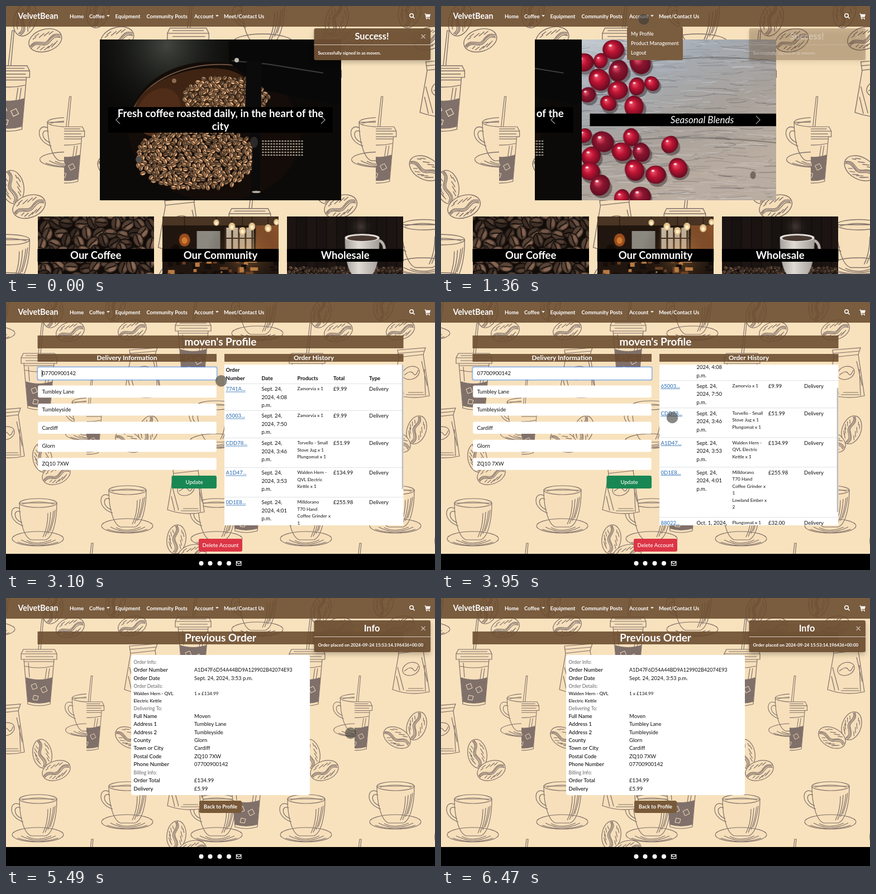
An HTML page with a canvas that plays this animation: 768 by 480 pixels, repeating every 7.16 s.

```html
<!DOCTYPE html>
<html lang="en">
<head>
<meta charset="utf-8">
<title>Coffee shop</title>
<style>
html, body { margin: 0; width: 100%; height: 100%; overflow: hidden; background: #f8e2bd }
canvas { display: block }
</style>
</head>
<body>
<canvas id="stage" width="768" height="480"></canvas>
<script>
const LOOP = 7160, W = 768, H = 480;
const ctx = document.getElementById('stage').getContext('2d');
const BROWN = 'rgba(105,74,45,.88)', CREAM = '#f8e2bd', INK = '#80706a';
const FONT = 'Lato, Cabin, "Open Sans", sans-serif';

let seed = 11;
const rnd = (a = 1, b = 0) => b + (a - b) * ((seed = seed * 16807 % 2147483647) / 2147483647);
const clamp = v => Math.max(0, Math.min(1, v));
const ramp = (t, a, b) => clamp((t - a) / (b - a));
const ease = p => p * p * (3 - 2 * p);

function picture(w, h, draw) {
  const c = document.createElement('canvas');
  c.width = w; c.height = h;
  draw(c.getContext('2d'));
  return c;
}
function rect(x, y, w, h, fill, g = ctx) { g.fillStyle = fill; g.fillRect(x, y, w, h); }
function round(x, y, w, h, r, fill) {
  ctx.beginPath(); ctx.roundRect(x, y, w, h, r);
  ctx.fillStyle = fill; ctx.fill();
}
function oval(g, x, y, rx, ry, fill, a = 0) {
  g.beginPath(); g.ellipse(x, y, rx, ry, a, 0, 7);
  g.fillStyle = fill; g.fill();
}
function poly(g, d, fill) { g.fillStyle = fill; g.fill(new Path2D(d)); }
function line(d, color, width, g = ctx) {
  g.strokeStyle = color; g.lineWidth = width; g.stroke(new Path2D(d));
}
function glow(g, x, y, r, color, w, h) {
  const f = g.createRadialGradient(x, y, 0, x, y, r);
  f.addColorStop(0, color); f.addColorStop(1, 'transparent');
  rect(0, 0, w, h, f, g);
}
// y is the middle of the capitals; "|" starts a new line
function text(s, x, y, size, { color = '#111', weight = 400, align = 'left', gap = 14.5, style = '' } = {}) {
  ctx.font = `${style} ${weight} ${size}px ${FONT}`;
  ctx.fillStyle = color; ctx.textAlign = align;
  s.split('|').forEach((l, i) => ctx.fillText(l, x, y + i * gap + size * .36));
}
const title = (s, x, y, size, o) => text(s, x, y, size, { color: '#fff', align: 'center', weight: 700, ...o });

// ---- wallpaper ----
const P = d => new Path2D(d);
const doodles = {
  bean: [P('M-26 0a26 17 0 1 0 52 0a26 17 0 1 0-52 0'),
    P('M-25 2C-12-9-6 8 4 1S18-6 25-1M-24 5C-12-4-6 12 5 5S18-1 24 3M-24 3C-12-6-6 10 4 3S18-4 24 1M-14-10L-6-13M-8-7L2-11M0-7L10-11M8-7L16-10M-18-7L-12-9M-16 9L-10 6M-12 12L-4 9M-6 14L3 10M0 13L10 8M6 13L14 8M10 11L18 6'),],
  cup: [P('M-46 34a46 13 0 1 0 92 0a46 13 0 1 0-92 0M-33-30C-33 5-24 32-12 36H14C26 32 34 5 34-30Z'),
    P('M-33-30a33.5 8 0 1 0 67 0a33.5 8 0 1 0-67 0M-28-28Q0-36 29-28M-32-20C-50-30-56 2-26 11M-31-14C-44-20-45 0-28 5M-20 37Q0 47 24 36M18-12Q18 14 9 31M23-14Q22 12 13 30M28-16Q26 6 18 25M31-18Q29 2 22 20M-36 40Q0 52 36 40M-30 36Q0 52 32 36')],
  togo: [P('M-28 0H28L32 8V18H-32V8ZM-27 18L-20 98Q0 104 20 98L27 18Z'),
    P('M-32 8H32M-24 13H26M-1 0L5-54L8-54L3 0M-24 4H24M-26 22H26M-26 30Q0 36 25 30M14 34L11 54M19 34L16 54M-19 24L-17 50')],
  bag: [P('M-24-42L26-46L22-34L33 40Q0 48-33 36L-22-28Z'),
    P('M-22-29L23-34M-23-36L24-40M-15 2a15 11-20 1 0 30-6a15 11-20 1 0-30 6M-12 3Q0-7 4 0T13-6M-26 12L-20 38M-24-4L-13 37M24-8L26 40M19-22L29 22M-5 34H22M-9 38H24')]
};
function doodle(g, kind, x, y, a = 0, s = 1) {
  g.save();
  g.translate(x, y); g.rotate(a); g.scale(s, s);
  const [body, lines] = doodles[kind];
  g.fillStyle = '#f6dfba'; g.fill(body);
  g.strokeStyle = INK; g.lineWidth = 1.2;
  g.stroke(body); g.stroke(lines);
  if (kind == 'togo') {
    poly(g, 'M-24 50Q0 58 24 50L20 94Q0 100-20 94Z', INK);
    line('M-14 64l8-3l3 8l-8 3ZM3 70l8-4l4 8l-8 4ZM-9 82l8 2l-2 7l-8-1Z', CREAM, 1, g);
  }
  g.restore();
}
function tile(g) {
  rect(0, 0, 480, 480, CREAM, g);
  [[420, 21, 1.9], [451, 53, -.3], [52, 8, 1.8], [82, 50, -.3], [401, 279, 1.4], [426, 309, -.35],
   [111, 229, 1.9], [76, 250, .5], [161, 425, 1.7], [189, 452, -.3]]
    .forEach(([x, y, a]) => doodle(g, 'bean', x, y, a));
  [[306, 22], [231, 215], [393, 390], [73, 367], [233, 390], [484, 206, 0, .9]].forEach(p => doodle(g, 'cup', ...p));
  [[101, 128], [336, 236], [178, 336]].forEach(p => doodle(g, 'bag', ...p));
  [[395, 92], [191, 34], [286, 312], [4, 186, 0, .86], [4, 486]].forEach(p => doodle(g, 'togo', ...p));
}
const wallpaper = (left, scale) => picture(W, H, g => {
  for (let k = -1; k < 2; k++) {
    g.save();
    g.translate(left + k * 480 * scale, 0); g.scale(scale, scale);
    g.beginPath(); g.rect(0, 0, 480, 480); g.clip();
    tile(g);
    g.restore();
  }
});
const homePaper = wallpaper(104, 1.1625), pagePaper = wallpaper(144, 1);

// ---- photos as simple shapes ----
function roast(g, x, y, r, [red, green, blue]) {
  const v = rnd(1.1, .6), tone = k => `rgb(${red * v * k},${green * v * k},${blue * v * k})`;
  g.save();
  g.translate(x, y); g.rotate(rnd(3.2)); g.scale(r, r);
  oval(g, 0, 0, 1.1, .82, tone(.3));
  oval(g, 0, 0, .95, .68, tone(.85));
  oval(g, -.05, -.3, .6, .26, tone(1.3));
  line('M-.85 .1C-.3-.2 .3 .3 .85 0', tone(.25), .16, g);
  g.restore();
}
// beans packed on a loose grid inside an ellipse
function pile(g, cx, cy, rx, ry, r, color) {
  for (let y = -ry, row = 0; y <= ry; y += r * 1.3, row++)
    for (let x = -rx + row % 2 * r; x <= rx; x += r * 1.8)
      if ((x / rx) ** 2 + (y / ry) ** 2 < 1)
        roast(g, cx + x + rnd(r, -r) * .4, cy + y + rnd(r, -r) * .4, r, color);
}
const TAN = [186, 138, 98], DARK = [98, 74, 60];
const roaster = picture(432, 288, g => {
  rect(0, 0, 432, 288, '#0b0a09', g);
  glow(g, 120, 10, 170, '#42463f', 432, 288);
  oval(g, 205, 165, 155, 125, '#130c08', .1);
  line('M58 130C80 70 160 38 240 46', '#6d5340', 2, g);
  oval(g, 165, 108, 105, 52, '#3f2413', -.25);
  oval(g, 105, 130, 36, 46, '#4f2d18', .6);
  pile(g, 225, 104, 78, 40, 5, TAN);
  pile(g, 172, 212, 108, 58, 5, TAN);
  for (let i = 0; i < 90; i++) oval(g, 292 + i % 15 * 5, 182 + (i / 15 | 0) * 5, 1.8, 1.3, '#a59b8c');
  poly(g, 'M230 0H432V118L300 92L232 42Z', '#080808');
  line('M236 38L300 44L400 60', '#3d3c3a', 2, g);
  poly(g, 'M262 40H290L286 288H270L274 180L260 150Z', '#0c0b0b');
  oval(g, 276, 184, 7, 10, '#2b2927');
  oval(g, 245, 37, 4, 4, '#bdb9ae');
  oval(g, 133, 74, 4, 4, '#8b6a52');
  oval(g, 70, 215, 6, 6, '#55504a');
  oval(g, 280, 273, 8, 2, '#b5aa9c');
});
const berries = picture(432, 288, g => {
  const f = g.createLinearGradient(0, 0, 130, 288);
  ['#c3c9d0', '#a5abb2', '#a8a19b', '#b9aca0'].forEach((c, i) => f.addColorStop(i / 3, c));
  rect(0, 0, 432, 288, f, g);
  for (let i = 0; i < 1100; i++) {
    const y = rnd(288), x = rnd(430, -40), l = rnd(60, 6);
    line(`M${x} ${y}q${l / 2} ${rnd(4, -4)} ${l} ${rnd(4, -4)}`,
      i % 2 ? `rgba(66,66,70,${rnd(.35)})` : `rgba(225,230,236,${rnd(.4)})`, rnd(1.6, .4), g);
  }
  line('M0 190Q200 160 432 196M120 40Q270 20 432 52', 'rgba(60,56,54,.4)', 2, g);
  oval(g, 307, 243, 5, 7, 'rgba(60,50,45,.55)');
  [[57, 18, 18], [105, 42, 19], [34, 38, 13], [4, 41, 17], [32, 72, 19], [66, 56, 18], [65, 91, 17], [126, 79, 13],
   [99, 84, 15], [11, 99, 14], [48, 114, 14], [94, 120, 18], [5, 172, 13], [38, 183, 19], [89, 175, 15], [17, 209, 17],
   [72, 201, 17], [107, 202, 16], [158, 188, 15], [15, 236, 17], [95, 234, 18], [33, 261, 18], [133, 242, 17],
   [173, 230, 17], [72, 283, 14], [105, 281, 18]].forEach(([x, y, r], i) => {
    oval(g, x + 3, y + 5, r * 1.05, r, 'rgba(45,30,35,.45)');
    const b = g.createRadialGradient(x - r * .3, y - r * .3, 1, x, y, r * 1.1);
    b.addColorStop(0, '#e8506a'); b.addColorStop(.4, i % 4 == 1 ? '#8d1631' : '#c01433'); b.addColorStop(1, '#5d0c20');
    oval(g, x, y, r * 1.08, r * .96, b, i);
    oval(g, x - r * .3, y - r * .4, r * .16, r * .12, '#ffd5da');
  });
});
const beanCard = picture(209, 103, g => {
  rect(0, 0, 209, 103, '#120b08', g);
  pile(g, 104, 52, 170, 115, 12, DARK);
});
const cafeCard = picture(209, 103, g => {
  rect(0, 0, 209, 103, '#21160f', g);
  rect(0, 0, 209, 16, '#4a3524', g);
  rect(62, 26, 42, 32, '#8b8880', g);
  rect(112, 20, 52, 42, '#d8cbb6', g);
  for (let i = 0; i < 5; i++) rect(112 + i * 12, 20, 3, 42, '#3b2b20', g);
  rect(112, 38, 52, 2, '#3b2b20', g);
  rect(168, 16, 41, 46, '#8a522c', g);
  glow(g, 150, 66, 70, 'rgba(214,150,84,.5)', 209, 103);
  for (let i = 0; i < 60; i++) rect(rnd(209), rnd(103, 62), rnd(16, 3), rnd(12, 3), ['#150e0a', '#6b4024', '#120c09', '#b87b43'][i % 4], g);
  oval(g, 24, 66, 10, 16, '#120d0a');
  [[40, 42, 10], [97, 11, 5], [125, 18, 6], [144, 26, 6], [161, 18, 6], [190, 21, 6], [205, 10, 5]].forEach(([x, y, r], i) => {
    line(`M${x} 0V${y - r}`, '#1a110b', 1, g);
    oval(g, x, y, r, r * 1.15, i ? '#e6c48f' : '#9b4c1d');
    oval(g, x, y + 1, r * .5, r * .6, i ? '#fff0c8' : '#d07d32');
  });
});
const mugCard = picture(209, 103, g => {
  rect(0, 0, 209, 103, '#120e0d', g);
  for (let i = 0; i < 12; i++) rect(i * 18, 0, 16, 92, `rgba(60,42,36,${rnd(.35, .1)})`, g);
  pile(g, 104, 108, 150, 20, 4, DARK);
  g.strokeStyle = '#b9b3ac'; g.lineWidth = 5;
  g.beginPath(); g.ellipse(164, 60, 11, 17, 0, 0, 7); g.stroke();
  const f = g.createLinearGradient(104, 0, 166, 0);
  f.addColorStop(0, '#a5a09b'); f.addColorStop(.4, '#e0dbd5'); f.addColorStop(1, '#a39d97');
  poly(g, 'M104 38C104 72 108 92 116 103H154C162 92 166 72 166 38Z', f);
  oval(g, 135, 38, 31, 7, '#e8e4df');
  oval(g, 135, 39, 27, 5, '#4a3a32');
  glow(g, 132, 18, 26, 'rgba(190,180,170,.22)', 209, 103);
});

// ---- shared page parts ----
function nav() {
  rect(0, 0, W, 37, BROWN);
  const o = { color: '#fff', weight: 700 };
  text('VelvetBean', 21.5, 18, 14.2, o);
  [['Home', 114], ['Coffee', 149], ['Equipment', 195.5], ['Community Posts', 251.5], ['Account', 337], ['Meet/Contact Us', 390]]
    .forEach(([s, x]) => text(s, x, 18.3, 9.35, o));
  [183, 378].forEach(x => poly(ctx, `M${x - 2.8} 16.2h5.6l-2.8 3Z`, '#fff'));
  line('M729.3 17a3.3 3.3 0 1 0-6.6 0a3.3 3.3 0 1 0 6.6 0M728.6 19.5L731.5 22.5', '#fff', 1.6);
  poly(ctx, 'M749.5 13.5h2l.5 1.2h8l-1.3 5h-6l.3 1.2h5.7v1.1h-6.7l-1.4-7.3h-1.1Z', '#fff');
  [753.3, 757.8].forEach(x => oval(ctx, x, 23, 1, 1, '#fff'));
}
function toast(head, body, alpha) {
  if (alpha <= 0) return;
  ctx.save();
  ctx.globalAlpha = alpha;
  ctx.shadowColor = 'rgba(0,0,0,.25)'; ctx.shadowBlur = 8; ctx.shadowOffsetY = 4;
  round(551.5, 40, 208.5, 57, 3, 'rgba(112,82,53,.95)');
  ctx.shadowColor = 'transparent';
  rect(551.5, 69, 208.5, 1, '#d9cdbf');
  title(head, 655, 54, 16.3);
  line('M743.5 51l7 7m0-7l-7 7', 'rgba(255,255,255,.6)', 1.3);
  text(body, 558.5, 83.7, 7.9, { color: '#fff', weight: 700 });
  ctx.restore();
}
function banner(s) {
  rect(56.5, 60, 655, 23, BROWN);
  title(s, 384, 71.5, 19);
}
function footer(top) {
  rect(0, top, W, H - top, '#000');
  const y = top + 17;
  [349.5, 365.5, 382.5, 399].forEach(x => oval(ctx, x, y, 4, 4, '#fff'));
  line(`M412.3 ${y - 3.4}h8.6v7h-8.6ZM412.3 ${y - 2}l4.3 3l4.3-3`, '#fff', 1.1);
}

// ---- pages ----
function slide(img, s, dx) {
  ctx.drawImage(img, 168 + dx, 60);
  const tall = s.includes('|') ? 46 : 22.5;
  rect(183 + dx, 204 - tall / 2, 402, tall, '#000');
  if (tall > 30) title(s, 384 + dx, 192, 18.6, { gap: 23.4 });
  else title(s, 384 + dx, 204, 17, { style: 'italic', weight: 400 });
}
function home(t) {
  ctx.drawImage(homePaper, 0, 0);
  const dx = -432 * ease(ramp(t, 930, 1530));
  ctx.save();
  ctx.beginPath(); ctx.rect(168, 60, 432, 288); ctx.clip();
  if (dx > -432) slide(roaster, 'Fresh coffee roasted daily, in the heart of the|city', dx);
  if (dx < 0) slide(berries, 'Seasonal Blends', dx + 432);
  line('M204 197l-7 7l7 7M564 197l7 7l-7 7', 'rgba(255,255,255,.6)', 1.3);
  ctx.restore();
  [[beanCard, 'Our Coffee'], [cafeCard, 'Our Community'], [mugCard, 'Wholesale']].forEach(([img, s], i) => {
    const x = 56.5 + i * 223.2;
    ctx.drawImage(img, x, 377, 208.5, 103);
    rect(x, 435, 208.5, 23, '#000');
    title(s, x + 104.2, 446, 18.5);
  });
  nav();
  if (t > 1130 && t < 1940) {
    round(333, 37, 100, 60, 3, '#7a5c3e');
    ['My Profile', 'Product Management', 'Logout'].forEach((s, i) =>
      text(s, 340, 50 + i * 17, 9, { color: '#fff', weight: 500 }));
  }
  toast('Success!', 'Successfully signed in as moven.', 1 - ramp(t, 1250, 1420));
}

const orders = [
  [156, '7741A...', 'Sept. 24,|2024, 4:08|p.m.', 'Zamorvia x 1', '£9.99'],
  [204, '65003...', 'Sept. 24,|2024, 7:50|p.m.', 'Zamorvia x 1', '£9.99'],
  [253, 'CDD78...', 'Sept. 24,|2024, 3:46|p.m.', 'Torvello - Small|Stove Jug x 1|Plungomat x 1', '£51.99'],
  [306, 'A1D47...', 'Sept. 24,|2024, 3:53|p.m.', 'Walden Hern -|QVL Electric|Kettle x 1', '£134.99'],
  [359, '0D1E8...', 'Sept. 24,|2024, 4:01|p.m.', 'Milldorano|T70 Hand|Coffee Grinder x|1|Lowland Ember x|2', '£255.98'],
  [449, '88022...', 'Oct. 1, 2024,', 'Plungomat x 1', '£32.00']
];
const address = ['07700900142', 'Tumbley Lane', 'Tumbleyside', 'Cardiff', 'Glorn', 'ZQ10 7XW'];

function profile(t) {
  ctx.drawImage(pagePaper, 0, 0);
  nav();
  banner("moven's Profile");
  rect(56.5, 93, 320.5, 14, BROWN);
  rect(391, 93, 320.5, 14, BROWN);
  title('Delivery Information', 216.5, 99.5, 11.7);
  title('Order History', 551, 99.5, 11.7);

  const focus = t < 4730;
  address.forEach((s, i) => {
    const y = 128 + i * 32.4;
    if (!i && focus) {
      round(55, 115, 324, 26, 4, 'rgba(13,110,253,.28)');
      round(56.5, 116.5, 321, 23, 3, '#86b7fe');
    }
    round(57.2, y - 10.8, 319.6, 21.6, 3, '#fff');
    text(s, 64.5, y, 9.5);
  });
  if (focus && (t < 2510 || Math.floor((t - 2510) / 500) % 2)) rect(64, 122, 1, 12, '#111');
  round(296.5, 311, 80.5, 23, 3, '#198754');
  title('Update', 337, 322.5, 9.6, { weight: 500 });
  round(345, 424, 78, 23, 3, '#dc3545');
  title('Delete Account', 384, 435.5, 9.5, { weight: 500 });

  const scroll = 53.7 * ease(ramp(t, 3430, 3900));
  rect(391, 112, 320.5, 288, '#fff');
  ctx.save();
  ctx.beginPath(); ctx.rect(391, 112, 320.5, 288); ctx.clip();
  ctx.translate(0, -scroll);
  const bold = { weight: 700 };
  text('Order|Number', 393.5, 122, 9.4, bold);
  [['Date', 457.5], ['Products', 521.5], ['Total', 586], ['Type', 650]].forEach(([s, x]) => text(s, x, 136.5, 9.4, bold));
  orders.forEach(([y, id, date, goods, cost]) => {
    rect(391, y - 10, 320.5, 1, '#dee2e6');
    text(id, 393.5, y, 9.5, { color: '#2469b3' });
    rect(393.5, y + 4.6, ctx.measureText(id).width, .8, '#2469b3');
    text(date, 457.5, y, 9.5);
    text(goods, 521.5, y - .5, 8.2, { gap: 12.5 });
    text(cost, 586, y, 9.5);
    text('Delivery', 650, y, 9.5);
  });
  ctx.restore();
  ctx.globalAlpha = 1 - ramp(t, 4250, 4520);
  round(708.7, 112 + scroll * .774, 2.6, 223, 1.3, '#bcbcbc');
  ctx.globalAlpha = 1;
  footer(451);
}

const details = [
  [114.5, 'Order Info:'],
  [128.7, 'Order Number', 'A1D47F6D54A44BD9A129902B42074E93', 9],
  [143.2, 'Order Date', 'Sept. 24, 2024, 3:53 p.m.'],
  [158, 'Order Details:'],
  [171, 'Walden Hern - QVL|Electric Kettle', '1 x £134.99', 8.2],
  [197.5, 'Delivering To:'],
  [211.7, 'Full Name', 'Moven'],
  [226, 'Address 1', address[1]],
  [240.3, 'Address 2', address[2]],
  [254.7, 'County', address[4]],
  [269, 'Town or City', address[3]],
  [283.5, 'Postal Code', address[5]],
  [298, 'Phone Number', address[0]],
  [312.5, 'Billing Info:'],
  [326.8, 'Order Total', '£134.99'],
  [341.3, 'Delivery', '£5.99']
];
function order(t) {
  ctx.drawImage(pagePaper, 0, 0);
  nav();
  banner('Previous Order');
  round(224, 102, 320, 251, 4, '#fff');
  details.forEach(([y, label, value, size = 9.5]) => {
    if (!value) return text(label, 228.5, y, 8.5, { color: '#666' });
    text(label, 228.5, y, size < 9 ? size : 9.5, { weight: 500, gap: 12.7 });
    text(value, 337, y, size);
  });
  round(346, 363, 76, 22, 3, '#785938');
  title('Back to Profile', 384, 374, 9.2);
  footer(446);
  toast('Info', 'Order placed on 2024-09-24 15:53:14.196436+00:00', ramp(t, 5020, 5170));
}

// ---- pointer: time, x, y ----
const track = [
  [200, 567, 102], [500, 430, 42], [710, 346, 17], [880, 363, 22], [1330, 363, 22], [1640, 363, 41], [1740, 363, 44.5],
  [2820, 363, 44.5], [3100, 385, 141], [3290, 419, 199], [3480, 414, 207], [4200, 414, 207], [4520, 411, 253],
  [4980, 411, 253], [5490, 617, 242], [LOOP, 617, 242]
];
function pointer(t) {
  const i = track.findIndex(k => k[0] > t);
  if (i < 1) return;
  const [t0, x0, y0] = track[i - 1], [t1, x1, y1] = track[i], p = ramp(t, t0, t1);
  ctx.globalAlpha = 1 - ramp(t, 6090, 6400);
  oval(ctx, x0 + (x1 - x0) * p, y0 + (y1 - y0) * p, 10, 10, 'rgba(56,56,54,.6)');
  ctx.strokeStyle = 'rgba(120,115,105,.5)'; ctx.lineWidth = 1; ctx.stroke();
  ctx.globalAlpha = 1;
}

const start = performance.now();
function frame() {
  const t = (performance.now() - start) % LOOP;
  (t < 2230 ? home : t < 5020 ? profile : order)(t);
  pointer(t);
  requestAnimationFrame(frame);
}
frame();
</script>
</body>
</html>
```
